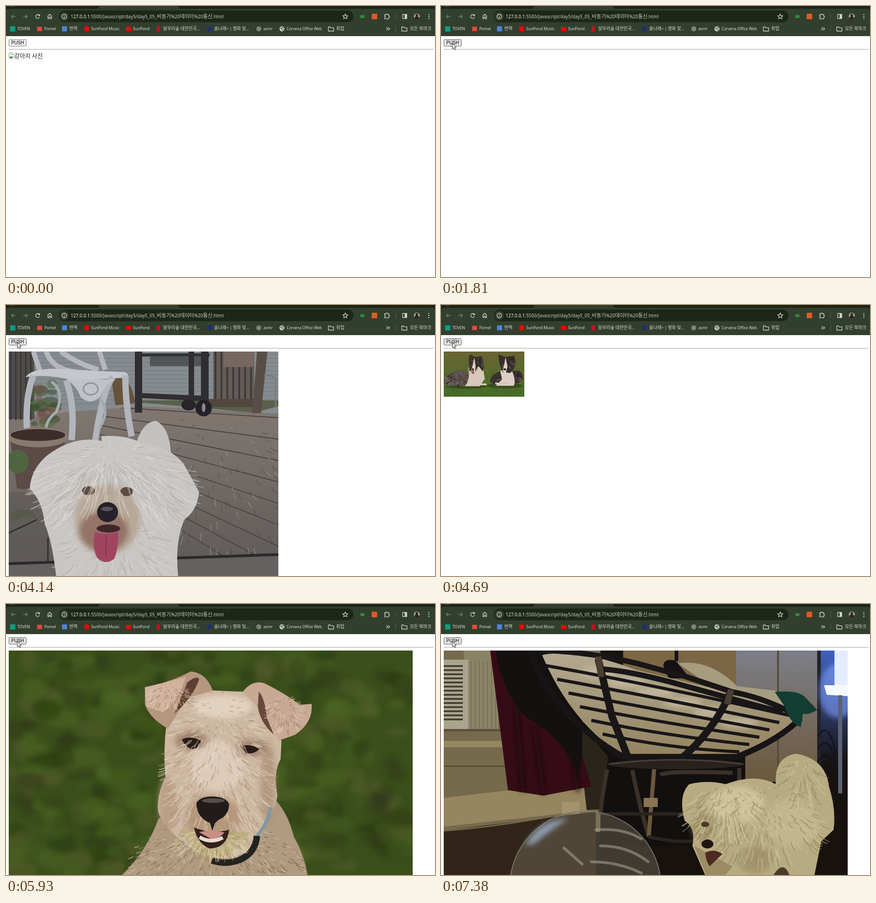
Animation of 942 by 594 pixels, one loop 8 s. Source, as an HTML page:

```html
<!DOCTYPE html>
<html lang="ko">
<head>
<meta charset="utf-8">
<title>비동기 데이터 통신</title>
<style>
html, body { margin: 0; width: 100%; height: 100%; overflow: hidden; background: #fff; }
#stage { display: block; width: 100%; height: 100%; }
text { font-family: "Noto Sans", "Noto Sans CJK KR", "Noto Sans CJK", sans-serif; white-space: pre; }
.line { fill: none; stroke: #d3d9cd; stroke-width: 1.3; }
.off { stroke: #78836f; }
.hair { fill: none; stroke-linecap: round; }
</style>
</head>
<body>
<svg id="stage" viewBox="0 0 942 594"></svg>
<script>
let seed = 7;
const rnd = () => (seed = seed * 16807 % 2147483647) / 2147483647;
const times = (n, f) => Array.from({ length: n }, (_, i) => f(i)).join('');
const rect = (x, y, w, h, fill, more = '') =>
  `<rect x="${x}" y="${y}" width="${w}" height="${h}" fill="${fill}" ${more}/>`;
const oval = (x, y, rx, ry, fill, more = '') =>
  `<ellipse cx="${x}" cy="${y}" rx="${rx}" ry="${ry}" fill="${fill}" ${more}/>`;
const shape = (d, fill, more = '') => `<path d="${d}" fill="${fill}" ${more}/>`;
const stroke = (d, color, w = 1, more = '') =>
  `<path d="${d}" fill="none" stroke="${color}" stroke-width="${w}" ${more}/>`;
const icon = (d, cls = '') => `<path class="line ${cls}" d="${d}"/>`;
const haze = body => `<g filter="url(#haze)">${body}</g>`;

// Hangul is set a little larger than Latin.
const label = (x, y, s, size, fill = '#dce2d6') =>
  `<text x="${x}" y="${y}" font-size="${size}" fill="${fill}">${
    s.replace(/[가-힣]+/g, m => `<tspan font-size="${size * 1.13}">${m}</tspan>`)}</text>`;

// Random soft strands inside an ellipse, hanging outward and down.
const hairs = (n, [cx, cy, rx, ry], colors, len, w = 1, drop = .5) =>
  `<g class="hair" stroke-width="${w}" opacity=".6" filter="url(#soften)">${times(n, () => {
    const a = rnd() * 6.283, k = Math.sqrt(rnd());
    const u = Math.cos(a) * k, v = Math.sin(a) * k;
    const dx = u * len, dy = (v * .6 + drop) * len;
    const color = colors[Math.floor(rnd() * colors.length)];
    return `<path stroke="${color}" d="M${(cx + u * rx).toFixed(1)} ${(cy + v * ry).toFixed(1)}q${
      (dx * .2).toFixed(1)} ${(dy * .6).toFixed(1)} ${dx.toFixed(1)} ${dy.toFixed(1)}"/>`;
  })}</g>`;

const blobs = (n, [x, y, w, h], colors, size) => times(n, () =>
  oval((x + rnd() * w).toFixed(), (y + rnd() * h).toFixed(), (size * (.4 + rnd())).toFixed(),
    (size * (.3 + rnd() * .6)).toFixed(), colors[Math.floor(rnd() * colors.length)], 'opacity=".5"'));

const photo = (id, w, h, body) =>
  `<svg id="${id}" x="6" y="102" width="${w}" height="${h}" viewBox="6 102 ${w} ${h}">${body}</svg>`;

const folder = x => icon(`M${x} 46h4l1.5 1.8h6v7.2h-11.5z`);

const chrome = () =>
  rect(0, 0, 942, 14, '#1b2517') +
  shape('M198 6q7 0 7-6H378q0 6 7 6z', '#333f2e') +
  shape('M0 66V12Q0 6 6 6H936Q942 6 942 12V66z', '#333f2e') +
  oval(14, 0, 7, 1.5, '#4a5644') +
  rect(116, 10, 647, 25.5, '#1c2717', 'rx="12.7"') +
  icon('M21 23H12M16 18.7L11.8 23 16 27.3', 'off') +
  icon('M38 23h9M43 18.7l4.2 4.3-4.2 4.3', 'off') +
  icon('M73.2 20.8A4.3 4.3 0 1 0 73.6 24.4M73.7 18v3.4h-3.4') +
  icon('M92 27.5v-6l4-3.3 4 3.3v6h-2.7v-3.4h-2.6v3.4z') +
  oval(128, 23, 10, 10, '#333f2e') +
  icon('M133 23a5 5 0 1 1-10 0a5 5 0 1 1 10 0M128 22.5v3.2M128 20v1.3') +
  label(142, 26.7, '127.0.0.1<tspan fill="#c9d1c1">:5500/Javascript/day5/day5_05_비동기%20데이터%20통신.html</tspan>', 9.98, '#eef2ea') +
  icon('M745 17.5l1.6 3.6 4 .4-3 2.6.9 3.9-3.5-2-3.5 2 .9-3.9-3-2.6 4-.4z') +
  rect(778, 20, 9, 6.5, '#2f8a3c') +
  rect(803, 17, 12, 12, '#dd5b26', 'rx="1"') +
  icon('M831.5 19h3a1.6 1.6 0 0 1 3.2 0h2.8v3a1.6 1.6 0 0 1 0 3.2v3h-9v-3a1.6 1.6 0 0 0 0-3.2z') +
  rect(855, 17, 1, 12, '#55634d') +
  icon('M871 18.5h9v9h-9z') + rect(875.5, 18.5, 4.5, 9, '#d3d9cd') +
  oval(902, 23, 6.5, 6.5, '#b3a79b') + shape('M897 27.3q0-3.6 3.4-4.4a2.8 2.8 0 1 1 3.2 0q3.4.8 3.4 4.4a6.5 6.5 0 0 1-10 0', '#29231f') +
  times(3, i => oval(928.5, 18.6 + i * 4.4, 1.2, 1.2, '#d3d9cd')) +
  rect(9, 44.5, 11.5, 11.5, '#109c80') + label(25, 53, 'TOVEN', 8.6) +
  rect(68.5, 45.5, 10.5, 9.5, '#e24b3d') + label(84, 53, 'Pomel', 8.6) +
  rect(123, 44.5, 11, 11, '#4b86d6') + label(139, 53, '번역', 8.6) +
  oval(177.3, 50, 5.7, 5.7, '#f00') + label(187, 53, 'SunPond Music', 8.6) +
  rect(263.5, 46, 11.5, 8.5, '#f00') + label(279, 53, 'SunPond', 8.6) +
  rect(331, 44.5, 7, 11.5, '#c8101a') + label(345, 53, '달무리숲 대한민국...', 8.6) +
  oval(447, 50, 5.5, 5.5, '#202d75') + label(457, 53, '솔나래+ | 영화 및...', 8.6) +
  oval(555, 50, 5.5, 5.5, '#7b8576') + label(565, 53, 'asmr', 8.6) +
  oval(606, 50, 5.5, 5.5, '#d3d9cd') + stroke('M602 48l3 1.5 1 3M606 46l1.5 2 3 0M608 54l1-2.5', '#333f2e', 1.6) +
  label(616, 53, 'Corvena Office Web', 8.4) +
  folder(708) + label(725, 53, '취업', 8.6) +
  icon('M835.5 47l3 3-3 3M839.5 47l3 3-3 3') +
  rect(855, 44, 1, 12, '#55634d') + folder(869) + label(887, 53, '모든 북마크', 8.6);

const page = () =>
  rect(6, 94.5, 933, 1, '#989898') +
  `<rect id="button" x="6.5" y="73.5" width="38" height="14.5" rx="2"/>
   <text x="25.5" y="84.3" font-size="10" text-anchor="middle" style="font-family:'Liberation Sans',Arial,sans-serif">PUSH</text>
   <g id="alt">${shape('M6.5 102.5h7l4 4v8h-11z', '#fff', 'stroke="#9a9a9a"') +
     shape('M7 114l3.5-5 2.5 2.5 2-1.5v4z', '#4b9b45') + oval(10, 106, 2, 1.4, '#a9c6ee') +
     stroke('M13.5 102.5v4h4', '#9a9a9a') + label(18, 114, '강아지 사진', 11.5, '#222')}</g>`;

const porchDog = () => photo('porch', 592, 492, `<g id="soft">` +
  rect(6, 102, 592, 492, 'url(#deck)') +
  times(9, i => stroke(`M200 ${222 + i * 20}L598 ${247 + i * 47}`, '#443f3d', 1.8)) +
  hairs(160, [450, 400, 170, 170], ['#524c49', '#9a9088', '#6f6660'], 16, 2, .7) +
  shape('M6 102H598V238L300 222 6 245z', '#858b8e') +
  times(13, i => stroke(`M6 ${108 + i * 9}H598`, '#6f767a')) +
  shape('M6 102H62V250H6z', '#4f4c49') + times(5, i => rect(9 + i * 11, 102, 3, 150, '#37363a')) +
  shape('M230 209H598V222L545 236 300 214z', '#5a6049') +
  blobs(26, [42, 165, 70, 95], ['#34482c', '#52693f', '#6d4a3e'], 15) +
  rect(455, 102, 90, 105, '#625b56') + times(7, i => rect(458 + i * 13, 102, 4, 104, '#3d3a3a')) +
  rect(478, 102, 66, 34, '#77685f') + rect(440, 206, 115, 18, '#51473f') +
  shape('M551 102H574L560 237H541z', '#574e48') +
  stroke('M567 155q25-2 25 12v58', '#777b7d', 3) +
  rect(299, 106, 148, 7, '#302e33') + rect(316, 110, 118, 24, '#3e4044', 'opacity=".7"') +
  rect(283, 102, 16, 134, '#302e33') + rect(401, 102, 12, 110, '#302e33') + rect(428, 102, 17, 112, '#302e33') +
  shape('M299 193L432 199V211L299 204z', '#302e33') +
  oval(401, 219, 16, 12, '#27252a') + oval(434, 226, 18, 18, '#232126') + oval(434, 225, 4, 10, '#8d8a88') +
  shape('M232 165Q270 140 284 215L240 220z', '#67523c') +
  stroke('M60 102L75 146M88 102Q105 150 180 148M120 102Q160 130 203 142M205 102L218 142', '#b4b8be', 11) +
  shape('M43 158Q60 132 160 143L262 147Q278 158 250 160L150 166Q90 150 43 158z', '#c4c8cd') +
  stroke('M60 155Q42 200 46 272M132 165Q152 220 144 296M235 158Q214 180 196 296M262 154Q262 220 276 288', '#b2b6bc', 14) +
  stroke('M100 168Q130 190 110 235Q90 250 88 270M205 205Q230 230 205 270', '#a6aaae', 6) +
  shape('M133 163H240Q215 175 208 200Q186 222 164 202Q155 178 133 163z', '#bfc3c8') +
  stroke('M170 184a16 13 0 1 0 32 0a16 13 0 1 0 -32 0', '#8e9298', 3) +
  shape('M10 298H130L108 380Q70 410 24 402z', '#5c4a47') +
  oval(70, 290, 66, 22, '#897a70') + oval(70, 285, 60, 13, '#3a2d2b') +
  oval(26, 343, 24, 26, '#4e6540') + shape('M8 455Q50 435 72 470Q40 455 14 478z', '#475c3a') +
  rect(6, 410, 90, 155, '#5f5a57', 'opacity=".65"') + stroke('M92 510V565M6 500L90 460', '#302d2d', 3) +
  shape('M6 570L598 551V594H6z', '#646160') + stroke('M6 567L598 547', '#2b292b', 6) +
  shape('M285 305Q300 255 330 254Q360 270 362 326z', '#c3c0bd') +
  shape('M210 287Q270 285 295 302Q360 310 390 348Q408 380 424 410Q420 450 392 470Q370 520 378 594H110Q102 520 85 480Q80 430 52 402Q55 360 90 330Q150 285 210 298z', '#c9c7c5') +
  hairs(430, [238, 395, 160, 92], ['#e6e5e5', '#aaa7a6', '#d9d6d3', '#bdb8b4'], 38, 1.6) +
  hairs(130, [245, 545, 118, 58], ['#dedcda', '#a9a19a', '#c9c0b6'], 30, 1.6) +
  haze(oval(222, 470, 72, 78, '#b3a08c', 'opacity=".8"') + oval(215, 495, 54, 46, '#7e5148', 'opacity=".6"')) +
  oval(181, 407, 14, 10, '#5c4a43') + oval(265, 409, 14, 10, '#5c4a43') +
  hairs(130, [223, 380, 80, 40], ['#dfdcd8', '#b5aca3'], 40, 1.7, .8) +
  oval(223, 454, 23, 22, '#252229') + oval(222, 447, 13, 5, '#55525a') +
  oval(225, 490, 26, 9, '#3f2628') +
  shape('M195 497Q220 505 246 497Q248 530 238 556Q218 572 200 554Q188 530 195 497z', '#a04560') +
  stroke('M220 505L219 550', '#7e3149', 2) + '</g>');

const collies = () => photo('collies', 177, 99,
  rect(6, 102, 177, 99, 'url(#lawn)') +
  hairs(330, [94, 178, 115, 32], ['#7a9a45', '#36551f', '#56792e'], 5, 1, -.6) +
  oval(55, 178, 45, 6, '#2e4519', 'opacity=".7"') + oval(140, 177, 40, 6, '#2e4519', 'opacity=".7"') +
  shape('M6 163Q25 140 55 144L68 178 20 176Q6 178 6 163z', '#5d534f') +
  hairs(90, [35, 161, 26, 12], ['#28221f', '#8d827b'], 7, 1.5) +
  shape('M60 137L92 135 96 162 85 178H52Q65 165 60 137z', '#d8c7bb') +
  shape('M61 116L64 108 75 114 90 112 92 122Q97 140 91 145L82 133 73 151 62 143z', '#3a322e') +
  hairs(30, [78, 128, 13, 12], ['#8a7d76', '#1d1918'], 5, 1.3) +
  shape('M73 115L76 133 75 150 66 146 69 134z', '#d9cbbf') + oval(70, 147, 3, 4, '#a55d5a') + oval(70, 141, 2.3, 2, '#171311') +
  shape('M107 167Q112 145 142 144H172Q182 151 179 166L160 176H118z', '#3a322e') +
  hairs(70, [150, 160, 27, 12], ['#8a7d76', '#1d1918', '#625853'], 6, 1.5) +
  shape('M130 144L155 142Q165 165 160 177H120L134 163z', '#ddcec3') +
  shape('M128 127L126 108 140 114 161 111 164 125Q163 140 152 149L135 147z', '#352d2a') +
  hairs(30, [147, 127, 14, 12], ['#8a7d76', '#1d1918'], 5, 1.3) +
  shape('M142 115L146 135 142 150 135 145 138 134z', '#ded0c5') + oval(140, 141, 3, 2, '#171311') +
  stroke('M70 174H100M119 172H148', '#d4c5b7', 4));

const terrier = () => photo('terrier', 887, 492,
  rect(6, 102, 887, 492, '#3b4f1b') +
  haze(blobs(330, [6, 102, 887, 492], ['#273a0f', '#4f6824', '#455c1e', '#33361a', '#575c2b'], 28)) +
  shape('M335 470Q440 440 592 430Q620 460 632 510Q655 550 662 594H255Q310 540 335 470z', '#b09a80') +
  hairs(450, [460, 565, 190, 85], ['#6f5f4a', '#d9c6ab', '#94805f'], 10, 2) +
  shape('M398 185Q440 190 520 192Q575 240 605 300L603 340Q586 370 596 420Q590 455 570 475Q560 540 495 556Q430 562 395 525Q345 490 334 455Q330 420 350 380Q345 320 352 265z', '#cdb8a2') +
  haze(oval(355, 440, 20, 60, '#b3967a', 'opacity=".7"') + oval(575, 390, 16, 90, '#a88c73', 'opacity=".7"') +
    oval(475, 225, 65, 25, '#e3d1bf') + oval(465, 355, 60, 55, '#ddcbb9') +
    oval(407, 300, 36, 22, '#8f715b', 'opacity=".7"') + oval(537, 316, 34, 19, '#8f715b', 'opacity=".7"') +
    oval(455, 470, 62, 50, '#a5805f', 'opacity=".6"')) +
  hairs(650, [465, 365, 112, 172], ['#eadccd', '#a88b74', '#dcc8b5', '#bda28b'], 20, 2) +
  shape('M305 182Q360 172 405 148Q440 150 454 190L400 205 355 273Q315 250 305 220z', '#b5967e') +
  shape('M305 183L395 160Q375 220 345 237L308 225z', '#d1b39d') +
  shape('M398 172Q420 155 424 165Q410 205 370 240z', '#5d3e30') +
  shape('M519 194Q540 165 568 174Q620 200 644 221L671 219Q675 260 634 287L600 299Q575 260 560 230z', '#c8a994') +
  shape('M555 192Q568 205 573 250L588 286Q558 260 553 225z', '#67483a') +
  hairs(130, [612, 240, 38, 38], ['#e0cab8', '#a58570'], 10, 2) +
  hairs(110, [360, 198, 44, 26], ['#e3cebe', '#a1806a'], 10, 2) +
  shape('M386 297Q405 287 428 300Q425 318 407 318Q393 312 386 297z', '#271c17') +
  shape('M518 311Q540 306 556 318Q545 330 527 327z', '#271c17') +
  hairs(40, [470, 305, 85, 14], ['#e6d6c6', '#cdb39c'], 24, 2, .8) +
  stroke('M582 445Q575 480 552 508', '#8596a0', 8) +
  stroke('M551 508Q548 545 515 560Q485 573 452 562', '#23231f', 14) +
  shape('M385 495Q400 540 450 558 505 555 535 500z', '#b9ab78', 'opacity=".7"') +
  hairs(170, [450, 525, 80, 28], ['#d9cd9d', '#97875a', '#e3d8bd'], 14, 2) +
  shape('M413 490Q450 505 490 495Q485 535 447 536Q420 525 413 490z', '#33211d') +
  shape('M424 500Q450 493 480 501Q465 517 450 515z', '#c98f84') +
  stroke('M425 511Q450 526 476 512', '#e8dccb', 8) +
  shape('M418 437Q426 421 455 422Q484 423 490 439Q489 464 467 473L459 480 453 497 448 480Q419 468 418 437z', '#211c1b') +
  oval(455, 431, 25, 5, '#55504e'));

const livingRoom = () => photo('room', 887, 492,
  rect(6, 102, 887, 492, '#18120f') +
  rect(6, 102, 344, 398, '#756a4c') + rect(50, 102, 76, 174, '#8b8367') +
  times(8, i => rect(56 + i * 9, 125, 2, 148, '#776f55')) +
  rect(6, 122, 54, 152, '#a9a48c') + times(14, i => rect(6, 134 + i * 9, 42, 4, '#454033')) +
  rect(6, 274, 126, 5, '#5c523b') + rect(6, 300, 130, 14, '#94865f') + rect(6, 354, 138, 3, '#574c35') +
  shape('M6 425L350 385V450L6 488z', '#95865f') + rect(266, 434, 38, 26, '#a39371') +
  shape('M6 497L340 455V594H6z', '#31251a') + stroke('M6 497Q120 490 300 455', '#75674a', 3) +
  shape('M300 280H375L350 450 320 452z', '#2b241a') +
  shape('M108 102H310V330L330 400 225 420 147 408z', '#350c16') +
  haze(stroke('M165 220L180 410M205 270L225 415M290 300L300 410', '#220810', 10)) +
  shape('M120 102H310V330L300 385Q280 300 190 250 150 220 125 130z', '#14100f') +
  rect(400, 102, 250, 270, '#7b6745') + rect(648, 102, 184, 298, 'url(#door)') +
  rect(738, 102, 4, 280, '#554c39') + rect(832, 102, 61, 250, 'url(#night)') + rect(826, 102, 8, 330, '#22232a') +
  haze(oval(872, 190, 42, 60, '#7f9fff', 'opacity=".6"')) +
  rect(864, 102, 29, 78, '#e4edff') + shape('M841 178H893V202L847 199z', '#f5f8ff') +
  rect(872, 200, 9, 215, '#5c6175') + times(4, i => stroke(`M828 ${290 + i * 28}Q850 ${250 + i * 28} 868 ${330 + i * 22}`, '#10121d', 3)) +
  shape('M300 250L420 335H668V385L735 390V530H345L370 340z', '#12100f') +
  shape('M488 135Q490 118 515 124L547 163H500z', '#141216') + stroke('M517 102V125', '#171416', 8) +
  shape('M520 130Q590 120 650 180L735 190 765 232 620 200z', '#a69c80') +
  shape('M222 112Q300 95 430 145L640 195 788 247Q735 310 655 336L400 333Q285 260 222 112z', 'url(#cushion)') +
  haze(times(6, i => oval(345 + i * 62, 150 + i * 22, 42, 12, '#c5bba2', 'opacity=".8"'))) +
  times(6, i => stroke(`M${230 + i * 25} ${135 + i * 30}Q${440 + i * 12} ${172 + i * 29} ${765 - i * 22} ${244 + i * 16}`, '#191617', 7)) +
  stroke('M195 102Q250 250 400 335H650Q740 300 790 250', '#171415', 13) +
  stroke('M200 102Q300 100 430 130L540 160 640 193Q710 205 785 246M345 142Q410 145 530 178T750 238', '#191617', 12) +
  stroke('M345 120L375 245 410 335M637 190Q600 280 520 345', '#191617', 16) +
  stroke('M345 115L352 160M637 188L628 220', '#4b3d31', 14) +
  shape('M733 193Q785 188 800 205L826 232Q805 245 795 240L790 270Q765 260 755 225z', '#123d30') +
  oval(516, 351, 148, 11, '#28221f') + stroke('M368 351Q516 332 664 351', '#4a4038', 3) +
  stroke('M365 362Q355 410 350 460M420 364Q440 460 455 505M482 375Q490 365 640 370M655 360V390', '#3a312a', 9) +
  stroke('M468 362L456 510', '#6a573c', 9) +
  stroke('M445 435H476', '#8a7350', 20) + stroke('M350 460H550M455 510Q520 525 560 518', '#2b231d', 7) +
  oval(317, 620, 167, 167, '#857e69', 'opacity=".38"') + oval(317, 620, 166, 166, 'none', 'stroke="#8d8875" stroke-width="2" opacity=".7"') +
  haze(shape('M185 530Q215 472 280 470Q240 495 205 525z', '#9db4d0', 'opacity=".8"')) +
  stroke('M340 495Q400 490 440 515M350 530Q410 530 455 565M330 565Q390 565 440 590M270 535L310 570', '#a9a38f', 6, 'opacity=".55" stroke-linecap="round"') +
  shape('M735 385Q735 335 780 328Q845 340 852 400Q868 450 862 495L835 520 820 594H580L552 530Q560 490 535 475Q520 420 545 395Q585 385 625 395Q690 370 735 395z', '#b8ab82') +
  haze(oval(650, 440, 60, 40, '#cfc39b') + oval(770, 480, 60, 50, '#c2b68e') +
    oval(690, 560, 40, 30, '#9a8b63', 'opacity=".7"') + oval(575, 490, 24, 30, '#8f7f58', 'opacity=".7"')) +
  hairs(300, [705, 475, 138, 86], ['#d4c699', '#8f8057', '#c2b488'], 22, 2) +
  hairs(90, [795, 382, 42, 42], ['#d1c7a3', '#8c8263', '#b8ab83'], 24, 2, .7) +
  hairs(180, [622, 448, 74, 48], ['#d9cda4', '#9a8b62', '#c8ba8e'], 28, 2, .8) +
  shape('M730 594Q752 560 765 594z', '#4a3c27') + shape('M556 530L640 575 625 594H582z', '#8b784f', 'opacity=".6"') +
  oval(580, 483, 9, 6, '#4b3b26') + oval(585, 526, 13, 10, '#201713') +
  shape('M580 545Q600 535 618 548Q605 560 590 575 582 565 580 545z', '#4e2a20'));

const gradient = (id, a, b) =>
  `<linearGradient id="${id}" x2="0" y2="1"><stop stop-color="${a}"/><stop offset="1" stop-color="${b}"/></linearGradient>`;
const blur = (id, size) => `<filter id="${id}"><feGaussianBlur stdDeviation="${size}"/></filter>`;

const stage = document.getElementById('stage');
stage.innerHTML = `<defs>
  ${gradient('deck', '#8c8179', '#5d5957')}${gradient('lawn', '#6a6433', '#456c26')}
  ${gradient('door', '#7c7e88', '#6b5738')}${gradient('night', '#3f62bd', '#18120f')}
  ${gradient('cushion', '#b3a990', '#93835f')}
  ${blur('haze', 6)}${blur('soften', .7)}${blur('blur', 3)}
  </defs>` + rect(0, 0, 942, 594, '#fff') + chrome() + page() +
  porchDog() + collies() + terrier() + livingRoom() +
  '<path id="cursor" d="M0 0V12L3 9.4 5 14 7 13 5 8.8H8.6z" fill="#fff" stroke="#111" stroke-width=".9"/>';

const el = id => document.getElementById(id);
const show = (id, on) => el(id).setAttribute('display', on ? 'inline' : 'none');
const stepped = (t, a, b, n) =>
  Math.max(0, Math.min(n - 1, Math.floor((t - a) / (b - a) * (n - 1) + 1e-6))) / (n - 1);
const mix = (a, b, k) => a + (b - a) * k;
const gray = v => `rgb(${v},${v},${v})`;

const LOOP = 8000;
const presses = [[1200, 1300], [4010, 4140], [5400, 5530], [6670, 6820]];
const photos = [['porch', 2850], ['collies', 4690], ['terrier', 5930], ['room', 7380]];

function draw(t) {
  const move = 1 - (1 - stepped(t, 110, 490, 13)) ** 2;
  show('cursor', t >= 110);
  el('cursor').setAttribute('transform', `translate(${mix(728, 25, move)} ${mix(477, 82, move)})`);

  const hover = t < 690 ? 0 : Math.min(1, stepped(t, 690, 900, 5) + .2);
  const down = presses.some(([a, b]) => t >= a && t < b);
  el('button').setAttribute('fill', gray(down ? 245 : mix(239, 229, hover)));
  el('button').setAttribute('stroke', gray(down ? 141 : mix(118, 79, hover)));

  show('alt', t < 1810);
  photos.forEach(([id, start], i) =>
    show(id, t >= start && t < (photos[i + 1]?.[1] ?? LOOP)));
  el('soft').setAttribute('filter', t < 2980 ? 'url(#blur)' : 'none');
}

const begin = performance.now();
function tick(now) {
  draw(Math.max(0, now - begin) % LOOP);
  requestAnimationFrame(tick);
}
draw(0);
requestAnimationFrame(tick);
</script>
</body>
</html>
```
